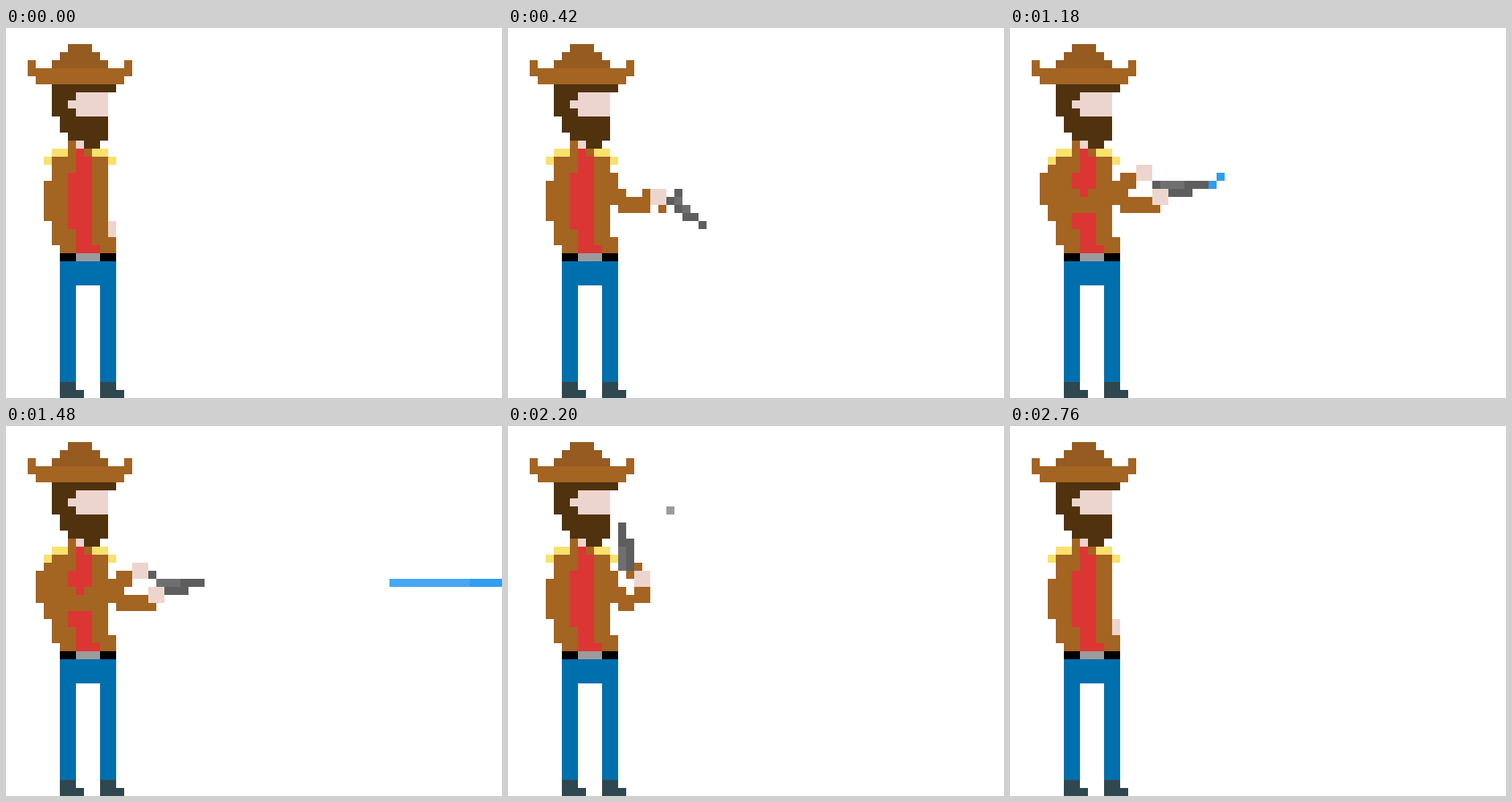
Recreate the animation shown at these times as an HTML page with a canvas. Size 617x460 px, loop 3260 ms.

```html
<!DOCTYPE html>
<html lang="en">
<head>
<meta charset="utf-8">
<title>Gunslinger</title>
<style>
html, body { margin: 0; width: 100%; height: 100%; overflow: hidden; background: #fff; }
canvas { display: block; }
</style>
</head>
<body>
<canvas id="stage" width="617" height="460"></canvas>
<script>
const ctx = document.getElementById('stage').getContext('2d');
const LOOP = 3260, STEP = 40;
const DRAW = 100, SWING = 540, REACH = 700, FAN = 740, COCK = 780, CHARGE = 880, FIRE = 1280,
  RELEASE = 1640, RAISE = 1720, SMOKE = 1760, HOLSTER = 2400, REST = 2760;
const HAT = '#965b20', COAT = '#a46422', HAIR = '#50320f', SKIN = '#edd5cf', RED = '#db3534',
  YELLOW = '#f8e16c', JEANS = '#006fad', BOOT = '#2f4850', GREY = '#9b9b9b',
  STEEL = '#5e5e5e', SHINE = '#6f6f6f', BLUE = '#2f9df1', GLOW = '#46a7f6';

const steps = (t, from, size = STEP) => Math.floor((t - from) / size);
const during = (t, from, to) => t >= from && t < to;

// One block on a grid of 10 px cells.
function block(color, x, y, w = 1, h = 1) {
  ctx.fillStyle = color;
  ctx.fillRect(x * 10 - 3, y * 10, w * 10, h * 10);
}

function drawHead() {
  for (let i = 0; i < 3; i++) block(HAT, 8 - i, 2 + i, 3 + 2 * i);
  for (let i = 0; i < 2; i++) {
    block(COAT, 3 + i, 5 + i, 13 - 2 * i);
    block(COAT, 3 + 12 * i, 4);
  }
  block(HAIR, 6, 7, 8);
  block(HAIR, 6, 8, 3, 3);
  block(HAIR, 7, 11, 6, 2);
  block(HAIR, 8, 13, 5);
  block(HAIR, 10, 14, 2);
  block(SKIN, 9, 8, 4, 3);
  block(SKIN, 8, 9);
  block(SKIN, 9, 14);
}

function drawTorso() {
  block(COAT, 8, 14, 3, 2);
  block(SKIN, 9, 14);
  block(HAIR, 10, 14, 2);
  block(COAT, 6, 16, 7, 11);
  block(COAT, 7, 26, 7, 2);
  block(RED, 9, 15);
  block(RED, 9, 16, 2, 12);
  block(RED, 8, 18, 3, 7);
  block(RED, 11, 27);
  for (const side of [0, 1]) {
    block(YELLOW, 6 + 5 * side, 15, 2);
    block(YELLOW, 5 + 8 * side, 16);
  }
}

function drawLegs() {
  block('#000', 7, 28, 7);
  block(GREY, 9, 28, 3);
  block(JEANS, 7, 29, 7, 3);
  for (const x of [7, 12]) {
    block(JEANS, x, 32, 2, 12);
    block(BOOT, x, 44, 2);
    block(BOOT, x, 45, 3);
  }
}

// The sleeve behind the body: each column further out is shorter.
function drawElbow(depth, height, taper) {
  for (let i = 0; i < depth; i++) block(COAT, 5 - i, 17 + i, 1, height - taper * i);
}

function swing(t, from, to) {
  const p = steps(t, from) * STEP / (to - from);
  return p > 0 && p < 1 ? Math.round(4 * Math.sin(Math.PI * p)) : 0;
}

function drawFarArm(t) {
  const depth = swing(t, SWING, REACH) + swing(t, RELEASE, 1920);
  if (during(t, REACH, RELEASE + STEP)) {
    drawElbow(2, 7, 3);
    block(COAT, 8, 20);
    block(COAT, 10, 20);
    block(COAT, 8, 21, 3, 2);
  } else if (depth) {
    drawElbow(depth, 9, 2);
    if (t >= 1840) block(SKIN, 6, 26, 1, 2);
  } else {
    block(COAT, 5, 19, 1, 5);
  }
  if (during(t, FAN, RELEASE)) {
    block(COAT, 13, 19, 3);
    block(COAT, 14, 18, 2);
    block(SKIN, 16, 17, 2, 2);
  }
}

function bentArm(wrist, shoulder = 18) {
  block(COAT, 13, shoulder, 1, 22 - shoulder);
  block(COAT, 14, 20);
  block(COAT, 14, 21, wrist - 13, 2);
}

const arms = {
  idle: { sleeve() {}, hand: [13, 24, 1, 2] },
  low: { sleeve() { block(COAT, 13, 19, 1, 5); }, hand: [13, 24, 2, 2], finger: [14, 26] },
  mid: {
    sleeve() {
      for (let i = 0; i < 3; i++) block(COAT, 13 + i, 18 + i, 1, 3);
      block(COAT, 15, 21, 2, 2);
      block(COAT, 17, 21);
    },
    hand: [17, 22, 2, 2], finger: [20, 23]
  },
  hold: {
    sleeve() { bentArm(17); block(COAT, 17, 20); },
    hand: [18, 20, 2, 2], finger: [20, 21]
  },
  aim: { sleeve() { bentArm(18, 20); }, hand: [18, 20, 2, 2], finger: [19, 19] },
  up: {
    sleeve() { bentArm(15); block(COAT, 16, 20, 2, 2); },
    hand: [16, 18, 2, 2], finger: [14, 17]
  }
};

// Directions run clockwise in eighths of a turn: 0 right, 2 down, 4 left, 6 up.
function drawGun([x, y], dir) {
  const plot = (color, a, b) => {
    for (let n = 0; n < dir >> 1; n++) [a, b] = [-b, a];
    block(color, x + a, y + b);
  };
  if (dir % 2) {
    plot(COAT, -1, 1);
    plot(COAT, -1, -1);
    plot(BLUE, -1, 0);
    plot(STEEL, 1, -1);
    plot(STEEL, 4, 3);
    for (let i = 0; i < 3; i++) {
      plot(STEEL, i, i);
      plot(i < 2 ? SHINE : STEEL, i + 1, i);
    }
  } else {
    plot(COAT, -1, 1);
    plot(COAT, 0, 2);
    for (let i = 0; i < 6; i++) {
      plot(i < 3 ? SHINE : STEEL, i, 0);
      if (i < 4) plot(STEEL, i, 1);
    }
  }
}

// Near arm and gun direction; without a direction the gun is holstered.
function nearPose(t) {
  if (!during(t, DRAW, REST)) return ['idle'];
  if (t < SWING) {
    const k = steps(t, DRAW);
    if (k < 3) return [k < 2 ? 'low' : 'mid', k ? 2 : undefined];
    return [k < 4 ? 'mid' : 'hold', (17 - k) % 8];
  }
  if (t < RELEASE + STEP) return ['aim', 0];
  if (t < RAISE) return ['hold', 7];
  if (t < HOLSTER) return ['up', 6];
  const k = steps(t, HOLSTER);
  if (k < 6) return [k < 2 ? 'hold' : 'mid', (k + 7) % 8];
  return ['low', k < 8 ? 2 : undefined];
}

function drawNearArm(t) {
  const [name, dir] = nearPose(t);
  const arm = arms[name];
  arm.sleeve();
  if (dir !== undefined) drawGun(arm.finger, dir);
  block(SKIN, ...arm.hand);
}

function drawHammer(t) {
  if (during(t, FAN, RELEASE)) block(STEEL, 18, during(t, COCK, FIRE) ? 19 : 18);
}

function drawCharge(t) {
  if (!during(t, CHARGE, FIRE)) return;
  const left = 4 - steps(t, CHARGE, 100);
  block(BLUE, 25 + left, 19 - Math.min(left, 3));
  block(BLUE, 24 + left, 18 + left);
}

function drawBeam(t) {
  if (!during(t, FIRE, 1540)) return;
  const step = t < 1480 ? steps(t, FIRE) : 5 + steps(t, 1480, 30);
  const tail = step * 10 - 2;
  for (let x = Math.max(tail, 25); x < Math.min(tail + 30, 62); x++) {
    block(x < tail + 10 ? GLOW : BLUE, x, 19);
  }
}

// Puffs leave the barrel one by one, then fade in the same order.
function drawSmoke(t) {
  if (!during(t, SMOKE, HOLSTER)) return;
  const end = Math.min(5, 2 + steps(t, SMOKE));
  const first = Math.max(0, steps(t, 1800, 100));
  const drift = Math.min(first, 1);
  for (let i = first; i < end; i++) {
    block(GREY, 14 + i + Math.min(i, 1) - (i > 2 ? 0 : 0) + drift, i > 2 ? 6 + i : 11);
  }
}

function draw(t) {
  ctx.fillStyle = '#fff';
  ctx.fillRect(0, 0, 617, 460);
  drawHead();
  drawTorso();
  drawLegs();
  drawNearArm(t);
  drawFarArm(t);
  drawHammer(t);
  drawCharge(t);
  drawBeam(t);
  drawSmoke(t);
}

const start = performance.now();
function tick() {
  draw((performance.now() - start) % LOOP);
  requestAnimationFrame(tick);
}
tick();
</script>
</body>
</html>
```
